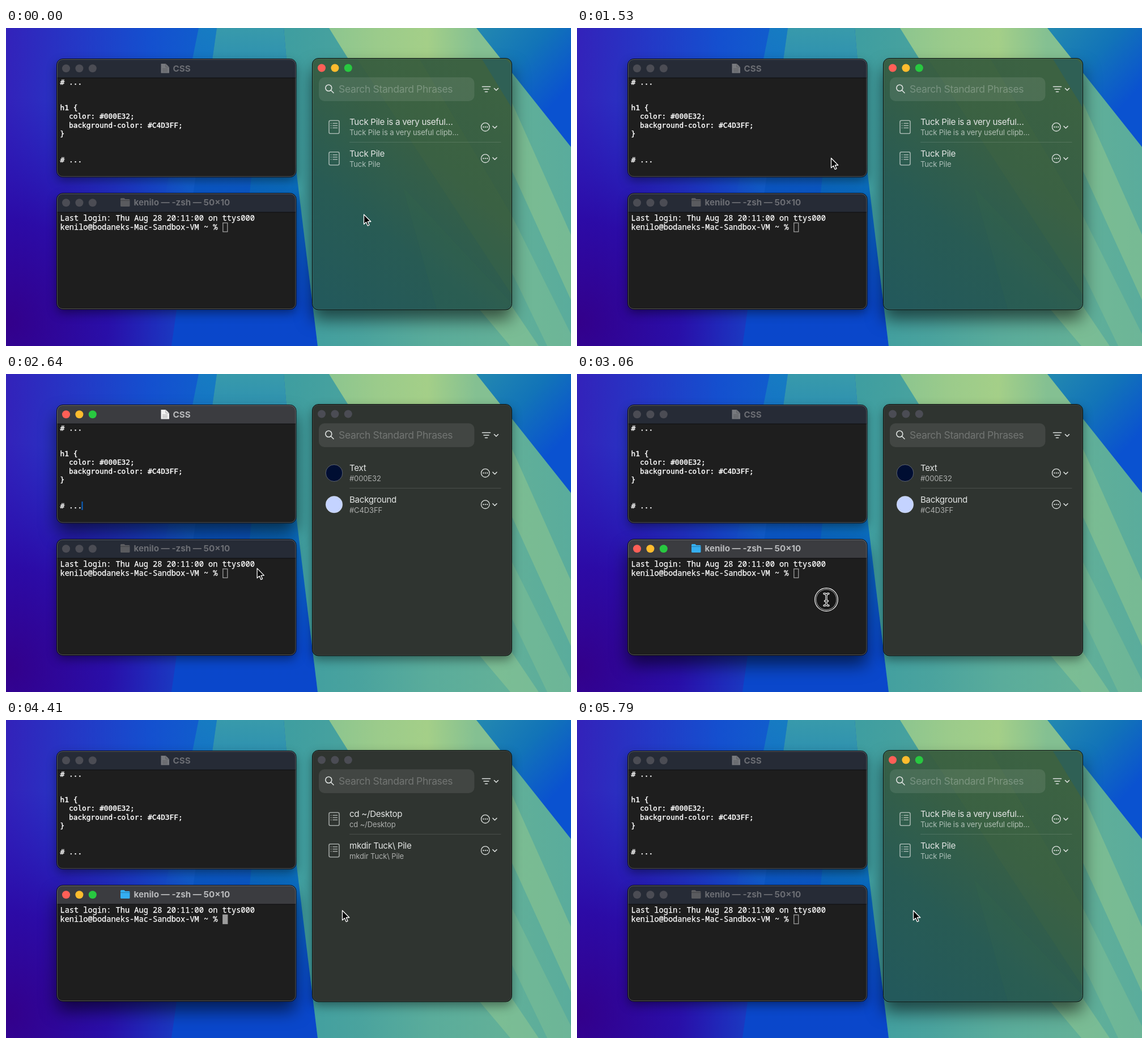
These frames come from a looping animation (997x561 px, 6270 ms). An HTML page:

```html
<!DOCTYPE html>
<html lang="en">
<head>
<meta charset="utf-8">
<title>Standard phrases</title>
<style>
html, body { margin: 0; width: 100%; height: 100%; overflow: hidden; background: #2a12b4; }
svg { display: block; width: 100vw; height: 100vh; }
text { white-space: pre; font-family: Inter, "Open Sans", sans-serif; fill: #e4e6e5; }
.frame { filter: drop-shadow(0 7px 9px rgba(0,0,0,.42)); }
.on .frame { filter: drop-shadow(0 17px 15px rgba(0,0,0,.58)); }
.bar { fill: #262b36; }
.on .bar { fill: #3b3c40; }
.light { fill: #4b4c54; }
.on .red { fill: #ff5f57; }
.on .yellow { fill: #febc2e; }
.on .green { fill: #28c840; }
.title { font-size: 15.2px; font-weight: 700; fill: #6b6d73; }
.on .title { fill: #b9babc; }
.doc { fill: #77797e; }
.on .doc { fill: #f2f2f2; }
.folder { fill: #5a5b5f; }
.on .folder { fill: #35aef0; }
.code { font: 12.83px "DejaVu Sans Mono", monospace; fill: #fff; stroke: #fff; stroke-width: .4px; }
.shell { font: 13.63px "Noto Sans Mono", "DejaVu Sans Mono", monospace; fill: #fff; stroke: #fff; stroke-width: .25px; }
.caret, .tint { visibility: hidden; }
.on .caret, .on .tint { visibility: visible; }
.search { font-size: 17.5px; letter-spacing: -.02em; fill: #fff; opacity: .25; }
.name { font-size: 15.17px; letter-spacing: -.02em; }
.detail { font-size: 13px; letter-spacing: -.01em; fill: #fff; opacity: .6; }
.line { fill: none; stroke: #dfe3e1; stroke-width: 1.6; stroke-linecap: round; stroke-linejoin: round; }
.note { opacity: .65; }
</style>
</head>
<body>
<svg id="stage" viewBox="0 0 997 561" preserveAspectRatio="none"></svg>
<script>
const LOOP = 6270;
const stage = document.getElementById('stage');
const $ = id => document.getElementById(id);

const poly = (points, fill, opacity = 1) =>
  `<polygon points="${points}" fill="${fill}" opacity="${opacity}"/>`;
const box = (x, y, w, h, r, attrs) =>
  `<rect x="${x}" y="${y}" width="${w}" height="${h}" rx="${r}" ${attrs}/>`;
const text = (x, y, kind, str) => `<text x="${x}" y="${y}" class="${kind}">${str}</text>`;
const line = (d, extra = '') => `<path class="line" d="${d}" ${extra}/>`;
const lights = (x, y) => ['red', 'yellow', 'green'].map((c, i) =>
  `<circle class="light ${c}" cx="${x + i * 23.4}" cy="${y}" r="7"/>`).join('');

// Evenly spaced colour stops along a line in stage coordinates
function gradient(id, x1, y1, x2, y2, ...colors) {
  const stops = colors.map((c, i) =>
    `<stop offset="${i / (colors.length - 1)}" stop-color="${c}"/>`).join('');
  return `<linearGradient id="${id}" gradientUnits="userSpaceOnUse" x1="${x1}" y1="${y1}" x2="${x2}" y2="${y2}">${stops}</linearGradient>`;
}

const defs = `<defs>
  ${gradient('night', 0, 0, 380, 0, '#3322ba', '#2438c6', '#1450cf', '#0f62cc')}
  ${gradient('ray', 0, 0, 0, 300, '#1a8cbca0', '#1a8cbc00')}
  ${gradient('beam', 400, 0, 370, 561, '#389aab', '#1f83b8', '#0b58c6', '#0a47ca', '#0a47cb')}
  ${gradient('beamEdge', 400, 400, 530, 220, '#0a80b800', '#0a84b4a0')}
  ${gradient('meadow', 500, 0, 997, 0, '#3f9ea0', '#4aa39e', '#5aac9b', '#62b098', '#5aac9c')}
  ${gradient('crown', 570, 0, 830, 0, '#8cc58f', '#9bcb8b', '#a4cf88', '#84c092')}
  ${gradient('sea', 830, 0, 970, 130, '#2489b0', '#1274b8', '#0a52d0')}
  ${gradient('glass', 560, 480, 860, 110, '#23595b', '#285b54', '#375f45', '#3c6242')}
  <radialGradient id="violet" gradientUnits="userSpaceOnUse" cx="0" cy="520" r="400">
    <stop offset="0" stop-color="#33008a"/><stop offset=".45" stop-color="#2b06a2" stop-opacity=".85"/>
    <stop offset="1" stop-color="#2410b4" stop-opacity="0"/>
  </radialGradient>
</defs>`;

const wallpaper =
  box(0, 0, 997, 561, 0, 'fill="url(#night)"') +
  box(0, 0, 400, 561, 0, 'fill="url(#violet)"') +
  poly('340,0 372,0 329,300 280,300', 'url(#ray)') +
  poly('372,0 292,561 550,561 512,250 490,0', 'url(#beam)') +
  poly('440,200 400,561 550,561 512,250', 'url(#beamEdge)') +
  poly('490,0 512,250 550,561 997,561 997,0', 'url(#meadow)') +
  poly('570,0 830,0 892,78 892,130 620,80', 'url(#crown)') +
  poly('830,0 997,210 997,0', 'url(#sea)') +
  poly('892,130 997,365 997,480 892,250', '#94ca8e', .5) +
  poly('892,330 997,540 997,561 955,561 892,430', '#94ca8e', .3) +
  poly('830,490 890,561 940,561 892,490', '#a0d08e', .4);

function terminalWindow(id, y, h, body) {
  return `<g id="${id}">
    ${box(90, y, 421.5, h, 10, 'class="frame" fill="#1e1e1e"')}
    <path class="bar" d="M90 ${y + 33}V${y + 10}a10 10 0 0 1 10-10h401.5a10 10 0 0 1 10 10v23z"/>
    <path d="M90 ${y + 33}h421.5" stroke="#0c0c0e"/>
    ${box(89.5, y - .5, 422.5, h + 1, 10.5, 'fill="none" stroke="#08080c"')}
    ${box(90.5, y + .5, 420.5, h - 1, 9.5, 'fill="none" stroke="#fff" stroke-opacity=".24"')}
    ${lights(106, y + 16.3)}${body}</g>`;
}

const source = ['# ...', '', '', 'h1 {', '  color: #000E32;', '  background-color: #C4D3FF;', '}', '', '', '# ...'];
const editor = terminalWindow('editor', 55, 207.5,
  '<path class="doc" d="M273.500 63h8.500l6 6v10.500h-14.500z"/><path d="M282 63v6h6M276 72h9M276 74.500h9M276 77h9" fill="none" stroke="#3336"/>' +
  text(294.5, 76.5, 'title', 'CSS') +
  source.map((s, i) => text(95.5, 99.6 + i * 15.22, 'code', s)).join('') +
  box(133.5, 225, 2, 15, 0, 'class="caret" fill="#0a62c4"'));

const shell = terminalWindow('shell', 292, 204,
  '<path class="folder" d="M202 301.500q0-1.500 1.500-1.500h5l2 2h6.500q1.500 0 1.500 1.500v10q0 1.500-1.500 1.500h-13.500q-1.500 0-1.500-1.500z"/><path d="M202 304.500h16.500" stroke="#0004"/>' +
  text(225.5, 313.3, 'title', 'kenilo — -zsh — 50×10') +
  text(95.5, 340, 'shell', 'Last login: Thu Aug 28 20:11:00 on ttys000') +
  text(95.5, 356.3, 'shell', 'kenilo@bodaneks-Mac-Sandbox-VM ~ % ') +
  box(382.8, 343.8, 8, 15.7, 0, 'id="block" stroke="#9c9c9c" stroke-width="1.3"'));

const noteIcon = `<g class="note">
  ${line('M572.500 -11.500h13q2.500 0 2.500 2.500v18q0 2.500-2.500 2.500h-13q-2.500 0-2.500-2.500v-18q0-2.500 2.500-2.500z')}
  ${line('M573.500 -6.500h.2M577 -6.500h7.500M573.500 -2.500h.2M577 -2.500h7.500M573.500 1.500h.2M577 1.500h7.500')}</g>`;
const swatch = color => `<circle cx="579" cy="0" r="14.800" fill="${color}" stroke="#fff" stroke-opacity=".3"/>`;
const row = (i, icon, name, detail) => `<g transform="translate(0 ${174.7 + i * 55.5})">
  ${icon}${text(606, -3.5, 'name', name)}${text(606, 14.5, 'detail', detail)}</g>`;
const list = (id, ...rows) => `<g id="${id}">${rows.map((r, i) => row(i, ...r)).join('')}</g>`;

const menu = y => `<circle class="line" cx="845.800" cy="${y}" r="7.300" style="stroke-width:1.3"/>` +
  [-3.4, 0, 3.4].map(d => `<circle cx="${845.8 + d}" cy="${y}" r="1.100" fill="#dfe3e1"/>`).join('') +
  line(`M859 ${y - 1.5}l3.500 3.500 3.500-3.500`);

const panel = `<g id="panel">
  ${box(540.5, 54, 352, 443, 10, 'class="frame" fill="#2f3430"')}
  <g class="tint">
    ${box(540.5, 54, 352, 443, 10, 'fill="url(#glass)"')}
    ${poly('620,55 730,55 892,330 892,470', '#5a7a38', .1)}
    ${poly('840,55 882,55 892,65 892,140', '#1c5c70', .4)}
    ${poly('700,280 892,485 880,497 760,497', '#3c7048', .1)}
  </g>
  ${box(540.5, 53.5, 352, 443.5, 10.5, 'fill="none" stroke="#08100c"')}
  ${box(541.5, 54.5, 350, 441.5, 9.5, 'fill="none" stroke="#fff" stroke-opacity=".07"')}
  ${lights(557, 70.5)}
  ${box(552, 87, 274.5, 42, 10, 'fill="#fff" fill-opacity=".09"')}
  <circle class="line" cx="569.300" cy="105.800" r="5.500"/>${line('M573.500 110l4.500 4.500')}
  ${text(587, 114, 'search', 'Search Standard Phrases')}
  ${line('M840.500 103.500h14M843 108h9M845.500 112.500h4M861.500 106.500l3.500 3.500 3.500-3.500')}
  <path d="M606 201.500h267.500" stroke="#fff" stroke-opacity=".13"/>
  ${menu(174.7)}${menu(230.2)}
  ${list('phrases', [noteIcon, 'Tuck Pile is a very useful…', 'Tuck Pile is a very useful clipb…'], [noteIcon, 'Tuck Pile', 'Tuck Pile'])}
  ${list('colors', [swatch('#000e32'), 'Text', '#000E32'], [swatch('#c4d3ff'), 'Background', '#C4D3FF'])}
  ${list('commands', [noteIcon, 'cd ~/Desktop', 'cd ~/Desktop'], [noteIcon, 'mkdir Tuck\\ Pile', 'mkdir Tuck\\ Pile'])}
</g>`;

const beamPath = 'M-4-10.500q4 0 4 3.500v14q0 3.500-4 3.500M4-10.500q-4 0-4 3.500v14q0 3.500 4 3.500M-2.500 2.500h5';
const pointer = `<g id="pointer">
  <g id="ring"><circle r="20.300" fill="#000" fill-opacity=".25" stroke="#fff" stroke-width="1.200"/>
    <circle r="18" fill="none" stroke="#fff" stroke-opacity=".75" stroke-width=".900"/></g>
  <path id="arrow" d="M.5.5v17.200l4-3.700 2.700 6.300 2.800-1.200-2.700-6.100h5.500z" fill="#000" stroke="#fff" stroke-width="1.300" stroke-linejoin="round"/>
  <g id="ibeam" fill="none" stroke-linecap="round"><path d="${beamPath}" stroke="#fff" stroke-width="3.400"/>
    <path d="${beamPath}" stroke="#111" stroke-width="1.200"/></g>
</g>`;

stage.innerHTML = defs + wallpaper + editor + shell + panel + pointer;

const moves = [ // start, end, target
  [1140, 1530, 448, 229],
  [2140, 2960, 440, 398],
  [3510, 4200, 593, 335.5],
];
const clicks = [[1770, 2010], [2970, 3165], [4425, 4635]];
const focusTimes = [[0, 'panel'], [1800, 'editor'], [3000, 'shell'], [4440, 'panel']];
const listTimes = [[0, 'phrases'], [1920, 'colors'], [3180, 'commands'], [4590, 'phrases']];

const current = (steps, t) => steps.filter(s => s[0] <= t).pop()[1];
const clamp = v => Math.min(1, Math.max(0, v));
const ease = p => (1 - Math.cos(Math.PI * p)) / 2;
const show = (id, on) => $(id).style.display = on ? '' : 'none';

function draw(t) {
  let x = 631, y = 328.5;
  for (const [start, end, tx, ty] of moves) {
    const p = ease(clamp((t - start) / (end - start)));
    x += (tx - x) * p;
    y += (ty - y) * p;
  }
  const focus = current(focusTimes, t), shown = current(listTimes, t);
  for (const id of ['editor', 'shell', 'panel']) $(id).classList.toggle('on', id === focus);
  for (const id of ['phrases', 'colors', 'commands']) show(id, id === shown);
  $('block').setAttribute('fill', focus === 'shell' && t >= 3090 ? '#9c9c9c' : 'none');

  const inText = x < 511 && (focus === 'editor' ? y < 262 : focus === 'shell' && y > 325);
  show('ibeam', inText);
  show('arrow', !inText);
  const press = Math.max(...clicks.map(([a, b]) => clamp(Math.min((t - a) / 60, (b - t) / 30))));
  $('ring').setAttribute('opacity', press);
  $('pointer').setAttribute('transform', `translate(${x} ${y})`);
}

function tick() {
  draw(performance.now() % LOOP);
  requestAnimationFrame(tick);
}
tick();
</script>
</body>
</html>
```
